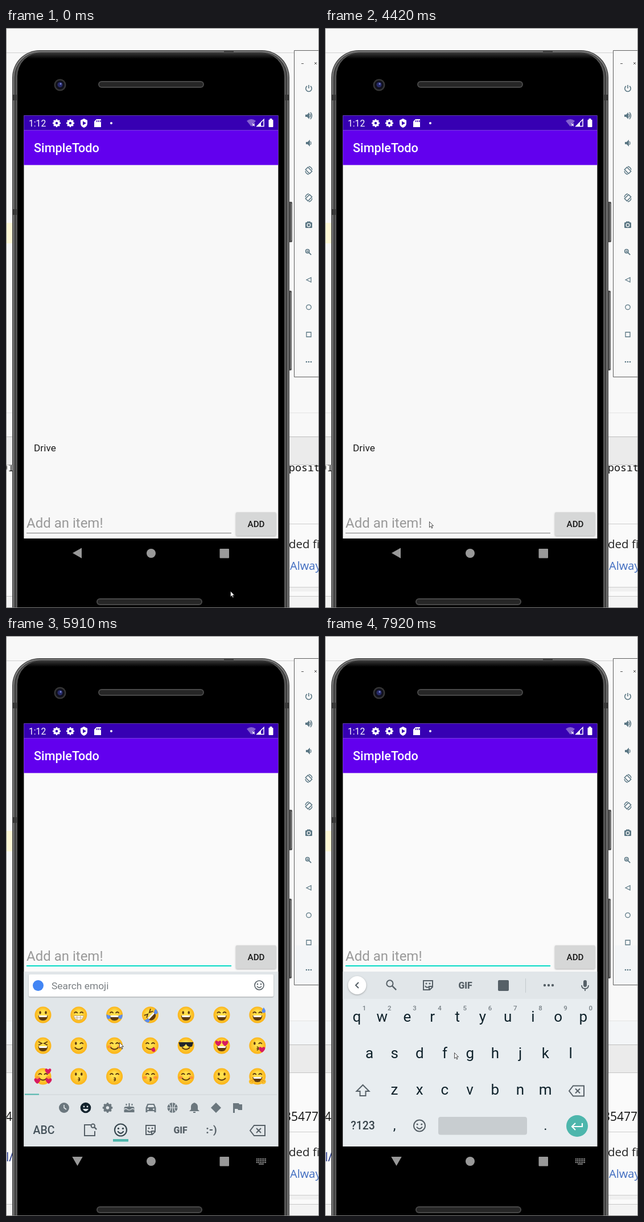
Animation of 550 by 1018 pixels, one loop 8 s. Source, as an HTML page with a canvas:

```html
<!DOCTYPE html>
<html lang="en">
<head>
<meta charset="utf-8">
<title>Todo app in a phone emulator</title>
<style>
html, body { margin: 0; overflow: hidden; }
canvas { display: block; }
</style>
</head>
<body>
<canvas id="stage" width="550" height="1018"></canvas>
<script>
const c = document.getElementById('stage').getContext('2d');
const LOOP = 8000, TEAL = '#4db6ac', ACCENT = '#03dac5', SLATE = '#5b7784', KEY = '#0f222b', ICON = '#566067';
const SCREEN = { x: 31.4, w: 447, top: 153.4, nav: 896, bottom: 948 };

// ---- drawing helpers ----
function rect(x, y, w, h, fill, r = 0) {
  c.fillStyle = fill;
  c.beginPath();
  c.roundRect(x, y, w, h, r);
  c.fill();
}
function band(y, bottom, fill) {
  rect(SCREEN.x, y, SCREEN.w, bottom - y, fill);
}
function oval(x, y, rx, fill, ry = rx) {
  c.fillStyle = fill;
  c.beginPath();
  c.ellipse(x, y, rx, ry, 0, 0, 7);
  c.fill();
}
function ring(x, y, r, color, width = 2) {
  c.strokeStyle = color;
  c.lineWidth = width;
  c.beginPath();
  c.arc(x, y, r, 0, 7);
  c.stroke();
}
function text(s, x, y, size, color, { font = 'Roboto', weight = 400, align = 'left' } = {}) {
  c.font = `${weight} ${size}px "${font}", sans-serif`;
  c.textAlign = align;
  c.fillStyle = color;
  c.fillText(s, x, y);
}
function at(x, y, draw, angle = 0) {
  c.save();
  c.translate(x, y);
  c.rotate(angle);
  draw();
  c.restore();
}
function fillPath(d, x, y, color, angle = 0) {
  at(x, y, () => { c.fillStyle = color; c.fill(new Path2D(d)); }, angle);
}
function strokePath(d, x, y, color, width = 2, angle = 0) {
  at(x, y, () => {
    c.strokeStyle = color;
    c.lineWidth = width;
    c.stroke(new Path2D(d));
  }, angle);
}
function shadowed(blur, draw) {
  c.save();
  c.shadowColor = 'rgba(0,0,0,.3)';
  c.shadowBlur = blur;
  c.shadowOffsetY = 1;
  draw();
  c.restore();
}
function clipped(x, y, w, h, draw) {
  c.save();
  c.beginPath();
  c.rect(x, y, w, h);
  c.clip();
  draw();
  c.restore();
}

// ---- shared icons ----
function gear(x, y, color, r = 4) {
  ring(x, y, r, color, r * .9);
  for (let i = 0; i < 8; i++) strokePath(`M${r * 1.3} 0H${r * 1.75}`, x, y, color, r * .65, i * Math.PI / 4);
}
function smiley(x, y, r, color, width = 2) {
  ring(x, y, r, color, width);
  oval(x - r * .38, y - r * .25, r * .16, color);
  oval(x + r * .38, y - r * .25, r * .16, color);
  strokePath(`M${-r * .5} ${r * .2}Q0 ${r * .9} ${r * .5} ${r * .2}`, x, y, color, width);
}
function search(x, y, r, color, width = 2) {
  ring(x - r * .3, y - r * .3, r * .8, color, width);
  strokePath(`M${r * .3} ${r * .3}L${r * 1.3} ${r * 1.3}`, x, y, color, width * 1.2);
}
function sticker(x, y) {
  strokePath('M-8-8H8V3L3 8H-8ZM8 2H2V8M-5 1Q-3 5 1 3', x, y, ICON);
  oval(x - 3, y - 3, 1.5, ICON);
  oval(x + 3, y - 3, 1.5, ICON);
}
function gif(x, y) {
  text('GIF', x, y + 5.5, 15.8, ICON, { weight: 900, align: 'center' });
}
function backspace(x, y) {
  strokePath('M-13 0L-6-9H13V9H-6ZM-2-4L6 4M6-4L-2 4', x, y, ICON);
}
function mic(x, y) {
  rect(x - 3, y - 9, 6, 12, ICON, 3);
  strokePath('M-6 0Q-6 6 0 6Q6 6 6 0M0 6V10', x, y, ICON, 1.8);
}
function dots(x, y, gap, r, color) {
  for (let i = -1; i < 2; i++) oval(x + i * gap, y, r, color);
}

// ---- page and window behind the phone ----
function backdrop(later) {
  rect(0, 0, 550, 1018, '#f8f8f8');
  rect(0, 43, 550, 1, '#cfcfcf');
  rect(0, 342, 14, 36, '#fff8d6');
  if (later) rect(0, 676, 550, 41, '#f3f5f7');
  rect(0, 675, 550, 1, '#e4e4e4');
  rect(0, 717, 550, 50, '#ebebeb');
  rect(0, 717, 550, 1, '#bdbdbd');
  rect(0, 766, 550, 1, '#c4c4c4');
  rect(0, 767, 550, 251, '#fafafa');
  const sans = { font: 'Open Sans' };
  if (later) {
    text('35477', 489, 851, 21, '#111', sans);
    text('43', -1, 851, 21, '#111', sans);
    text('l/', 0, 922, 21, '#1c2f86', sans);
  } else {
    clipped(0, 767, 550, 30, () => {
      const mono = { font: 'Noto Sans Mono', weight: 500 };
      text('posit', 497, 778, 18.3, '#111', mono);
      text('01.', -8, 778, 18.3, '#111', mono);
    });
  }
  rect(490, 982, 60, 7, '#f0f0f0');
  strokePath('M480 870.5H550M480 981.5H550', 0, 0, '#cccccc', 1);
  text('ded fi', 497, 913, 20.5, '#222', sans);
  text('Alway', 499, 951, 20, '#3f6cc0', sans);
  rect(0, 997, 550, 1, '#c8c8c8');
  rect(0, 998, 550, 20, '#f3f3f3');
}

function emulatorPanel(later) {
  rect(506, 39, 44, 573, '#f8f8f8');
  if (later) rect(506, 543, 44, 69, '#f3f5f7');
  strokePath('M550 39.5H506.5V612.5H550', 0, 0, '#5c5c5c', 1);
  strokePath('M519 62.5H523M542 60L546 64M546 60L542 64', 0, 0, '#555', 1);
  const x = 532;
  strokePath('M-3-4A5.2 5.2 0 1 0 3-4M0-6V0', x, 106, SLATE, 1.6);
  for (const [y, waves] of [[154, 1], [202, 0]]) {
    fillPath('M-5-2H-2L2-6V6L-2 2H-5Z', x - waves, y, SLATE);
    if (waves) strokePath('M3-3Q5 0 3 3M4-6Q9 0 4 6', x - 1, y, SLATE, 1.5);
    else strokePath('M3-3Q5 0 3 3', x, y, SLATE, 1.3);
  }
  for (const [y, side] of [[250, 1], [298, -1]]) {
    strokePath('M-3-5H3V5H-3Z', x, y, SLATE, 1.5, -side * Math.PI / 4);
    strokePath(`M${-side * 6} 1Q${-side * 5} 6 0 7M${side * 6}-1Q${side * 5}-6 0-7`, x, y, SLATE, 1.3);
  }
  rect(x - 6, 341, 12, 10, SLATE, 1.5);
  rect(x - 3, 339.5, 6, 3, SLATE);
  ring(x, 346, 2.8, '#f8f8f8', 1.3);
  search(x - 1, 393, 4, SLATE, 1.5);
  strokePath('M-4-1H0M-2-3V1', x, 393, SLATE, 1);
  strokePath('M-4 0L4-4V4Z', x, 442, SLATE, 1.3);
  ring(x, 490, 4.2, SLATE, 1.3);
  strokePath('M-4-4H4V4H-4Z', x, 538, SLATE, 1.3);
  dots(x, 586, 4, 1.3, SLATE);
}

function phone() {
  rect(496, 305, 7, 71, '#4d4d4d', 2);
  rect(496, 461, 6, 140, '#4d4d4d', 2);
  strokePath('M501.5 308V373M500.5 464V598', 0, 0, '#9a9a9a', 1);
  rect(11, 39, 487, 1100, '#3d3d3d', 48);
  c.strokeStyle = '#808080';
  c.lineWidth = 2;
  c.beginPath();
  c.roundRect(13.5, 41.5, 482, 1100, 45);
  c.stroke();
  rect(17, 43, 475, 1100, '#555', 43);
  const edge = c.createLinearGradient(0, 43, 0, 54);
  edge.addColorStop(0, '#3a3a3a');
  edge.addColorStop(1, '#000');
  rect(20, 43, 469, 1100, edge, 42);
  for (const y of [117, 318]) rect(11, y, 8, 10, '#383838');
  rect(490, 117, 8, 10, '#383838');
  rect(383, 40, 17, 4, '#444');

  oval(95, 100, 10.5, '#363636');
  oval(95, 100, 8, '#11111c');
  oval(95, 99.5, 4.5, '#262a68');
  oval(96, 98, 1.5, '#7c8ad8');
  for (const [x, y] of [[162, 93], [159, 1001]]) {
    rect(x, y, 186, 12, '#484848', 6);
    rect(x + 2, y + 2, 182, 8, '#262626', 4);
  }
}

// ---- app ----
function appBars() {
  band(SCREEN.top, 179.6, '#3700b3');
  band(179.6, 240.4, '#6200ee');
  text('1:12', 40, 173, 15.7, '#fff');
  gear(89, 167, '#fff');
  gear(113, 167, '#fff');
  fillPath('M0-8L6-5V0Q6 6 0 8Q-6 6-6 0V-5Z', 137, 167, '#fff');
  fillPath('M-2-3.5L4 0L-2 3.5Z', 137, 167, '#3700b3');
  fillPath('M-2-7H6V7H-6V-3Z', 161, 167, '#fff');
  for (const x of [159, 162, 165]) rect(x, 162, 1.5, 3, '#3700b3');
  oval(185, 167, 2, '#fff');
  fillPath('M-8-4Q0-10 8-4L0 6Z', 431, 167, 'rgba(255,255,255,.38)');
  strokePath('M-2-2L2 2M2-2L-2 2', 435, 170, '#fff', 1.3);
  strokePath('M0 12L12 0V12Z', 441, 160.5, '#fff', 1.5);
  fillPath('M0 12L7 5V12Z', 441, 160.5, '#fff');
  rect(461.5, 161, 8, 13, '#fff', 1);
  rect(463.5, 159, 4, 3, '#fff');
  text('SimpleTodo', 49, 218, 21.7, '#fff', { weight: 500 });
}

function inputRow(dy, focused, caret) {
  at(0, dy, () => {
    text('Add an item!', 36, 877, 24, '#999');
    if (focused) rect(36, 885, 360, 2, ACCENT);
    else rect(36, 886, 360, 1, '#777');
    if (caret) rect(36, 852, 2, 33, ACCENT);
    shadowed(3, () => rect(404, 850, 70.5, 41, '#d6d7d7', 2));
    text('ADD', 439.5, 876, 15.2, '#161616', { weight: 500, align: 'center' });
  });
}

function navBar(turn) {
  const color = turn > 0 && turn < 1 ? '#d8d8d8' : '#999';
  fillPath('M-8.5 0L7.5-9.2V9.2Z', 125.5, 921.6, color, -turn * Math.PI / 2);
  oval(255, 922, 8, color);
  rect(375.5, 914, 16.5, 16.5, color, 1);
  if (turn > .5) {
    for (let i = 0; i < 18; i++) rect(440 + i % 6 * 3, 917 + Math.floor(i / 6) * 3, 2, 2, color);
    rect(444, 926, 9, 1.5, color);
  }
}

function keyboard(expanded, pressed) {
  band(589, 949, '#e8edf0');
  band(589, 637, '#e1e6e9');
  shadowed(3, () => oval(56.5, 613, 16, '#fff'));
  strokePath(expanded ? 'M2.5-5L-2.5 0L2.5 5' : 'M-2.5-5L2.5 0L-2.5 5', 56.5, 613, ICON);
  mic(457, 613);
  if (expanded) {
    search(116, 612, 7, ICON);
    sticker(181, 613);
    gif(246.5, 613);
    rect(304, 604, 19, 19, ICON, 2);
    rect(352, 601, 1, 25, '#c3c9cc');
    dots(393, 613, 7, 2.2, ICON);
  }
  const rows = [['qwertyuiop', 56, 677], ['asdfghjkl', 78, 741], ['zxcvbnm', 122, 805]];
  for (const [keys, left, base] of rows)
    [...keys].forEach((key, i) => text(key, left + i * 44.2, base, 26, KEY, { align: 'center' }));
  [...'1234567890'].forEach((n, i) => text(n, 69 + i * 44.2, 657, 11.5, '#788187', { weight: 500, align: 'center' }));
  strokePath('M0-10L11 1H5V9H-5V1H-11Z', 66.5, 798, ICON);
  backspace(442, 798.5);
  if (pressed) rect(146, 844, 40, 32, '#d0d5d8', 4);
  text('?123', 66.5, 866, 19.4, '#37434a', { weight: 500, align: 'center' });
  text(',', 122, 867, 24, KEY, { align: 'center' });
  smiley(166, 859.5, 10, ICON);
  rect(199, 844, 156, 31.5, '#c8cdd0', 4);
  text('.', 387.5, 867, 24, KEY, { align: 'center' });
  oval(443, 860, 19, TEAL);
  strokePath('M9-5V1H-8M-3-5L-9 1L-3 7', 443, 860, '#fff', 2.2);
}

// Slides up while fading in as one layer, passing under the navigation bar.
function risingKeyboard(offset, opacity) {
  clipped(SCREEN.x, 589, SCREEN.w, SCREEN.bottom - 589, () => {
    band(SCREEN.nav, SCREEN.bottom, '#fafafa');
    c.translate(0, offset);
    keyboard(false, false);
    band(589, 949, `rgba(250,250,250,${1 - opacity})`);
  });
  band(SCREEN.nav, SCREEN.bottom, 'rgba(0,0,0,.54)');
}

// ---- emoji panel: each face is eyes, mouth, optional extra ----
const FACES = '.D ^E ^Dt >Dr .D ^D ^Ds >D ;) ^)b ^p B) hD ;*h ^)H .* ^* ^*b ^)b .) ^Dg'.split(' ');
const HEART = 'M0 5C-10-2-4-8 0-3C4-8 10-2 0 5Z', DROP = 'M0-5Q4 0 3 3Q0 6-3 3Q-4 0 0-5Z';
const BROWN = '#5d3a10', PINK = '#d81b60', BLUE = '#5b8def';

function face(x, y, [eyes, mouth, extra]) {
  at(x, y, () => {
    const skin = c.createRadialGradient(0, -3, 4, 0, 0, 15);
    skin.addColorStop(0, '#ffe04d');
    skin.addColorStop(1, '#fbb116');
    oval(0, 0, 14.5, skin);
    if (extra === 'b' || extra === 'H') for (const s of [-9, 9]) oval(s, 2, 3.5, 'rgba(255,110,60,.55)', 2.5);
    if (eyes === 'B') fillPath('M-13-6H13L11 1Q7 4 2 0L0-3L-2 0Q-7 4-11 1Z', 0, 0, '#22262b');
    else for (const s of [-1, 1]) {
      const ex = s * 5;
      if (eyes === '.' || (eyes === ';' && s < 0)) oval(ex, -4, 1.8, BROWN, 2.8);
      else if (eyes === 'h') fillPath(HEART, s * 6, -4, PINK);
      else if (eyes === '>') strokePath(`M${s * 3}-7L${-s * 3}-4L${s * 3}-1`, ex, 0, BROWN, 1.8);
      else strokePath('M-3-3Q0-7 3-3', ex, 0, BROWN, 1.8);
    }
    if (mouth === 'D') {
      fillPath('M-8.5 1H8.5Q8 10 0 10Q-8 10-8.5 1Z', 0, 0, BROWN);
      fillPath('M-7.5 1H7.5L6.5 4H-6.5Z', 0, 0, '#fff');
    } else if (mouth === 'E') {
      const grin = 'M-8.5 1.5H8.5Q8 9 0 9Q-8 9-8.5 1.5Z';
      fillPath(grin, 0, 0, '#fff');
      strokePath(grin + 'M-8 5H8M-3 2V9M3 2V9', 0, 0, '#b79a68', .8);
    } else if (mouth === '*') {
      strokePath('M-1 2Q4 3 0 5Q4 6-1 8', 0, 0, BROWN, 1.7);
    } else {
      strokePath('M-7 3Q0 10 7 3', 0, 0, BROWN, 1.8);
      if (mouth === 'p') fillPath('M1 6L7 3Q11 9 7 11Q3 11 1 6Z', 0, 0, PINK);
    }
    if (extra === 't' || extra === 'r') for (const s of [-1, 1]) fillPath(DROP, s * 11, 3, BLUE, s * .7);
    if (extra === 's') fillPath(DROP, 11, -8, BLUE);
    if (extra === 'h') fillPath(HEART, 8, 7, PINK);
    if (extra === 'H') for (const [hx, hy] of [[-10, 8], [10, 8], [9, -9]]) fillPath(HEART, hx, hy, PINK);
    if (extra === 'g') for (const s of [-1, 1]) {
      oval(s * 10, 9, 5, '#fbc02d', 4.5);
      strokePath(`M${s * 6} 7L${s * 10} 11M${s * 7} 5L${s * 13} 9`, 0, 0, '#d98a12', 1);
    }
  }, extra === 'r' ? -.8 : 0);
}

function categories() {
  const y = 828, gray = '#6b777e', gap = '#e1e6e9';
  oval(102, y, 9, gray);
  strokePath('M0-5V0L4 3', 102, y, gap, 1.6);
  oval(140, y, 9.3, '#13232d');
  for (const s of [-3, 3]) oval(140 + s, y - 2, 1.4, gap);
  fillPath('M-5 2H5Q3 6 0 6Q-3 6-5 2Z', 140, y, gap);
  gear(178.5, y, gray, 5);
  fillPath('M-9 8V1Q-9-2-6-2H-1V-8H1V-2H6Q9-2 9 1V8ZM-6-4V-7H-4V-4ZM4-4V-7H6V-4Z', 216.5, y, gray);
  strokePath('M-9 3Q-6 0-3 3Q0 5 3 3Q6 0 9 3', 216.5, y, gap, 1.2);
  fillPath('M-9 8V0L-6-7H6L9 0V8H6V6H-6V8Z', 254.5, y, gray);
  fillPath('M-6-1H6L4.5-5H-4.5Z', 254.5, y, gap);
  for (const s of [-5, 5]) oval(254.5 + s, y + 2.5, 1.5, gap);
  oval(292.5, y, 9, gray);
  strokePath('M0-9V9M-9 0H9M-6-7Q0 0-6 7M6-7Q0 0 6 7', 292.5, y, gap, 1.2);
  fillPath('M-9 6L-6 3V-2Q-6-7 0-9Q6-7 6-2V3L9 6ZM-2 7H2V9H-2Z', 331, y, gray);
  fillPath('M0-9L9 0L0 9L-9 0Z', 369, y, gray);
  fillPath('M-8-8H2L3-6H8V4H1L0 2H-5V9H-8Z', 407, y, gray);
}

function emojiPanel(pressed) {
  band(589, SCREEN.nav, '#e1e6e9');
  shadowed(2, () => rect(40, 594, 430, 39, '#fff', 2));
  oval(56.5, 613.5, 9.5, '#4285f4');
  text('Search emoji', 80, 620, 17.4, '#7a7f83');
  smiley(445, 613, 8, ICON, 1.6);
  FACES.forEach((f, i) => face(65 + i % 7 * 62.8, 665 + Math.floor(i / 7) * 54, f));
  rect(33, 804.5, 443, 1, '#cfd5d8');
  rect(33, 803.5, 25, 2, TEAL);
  categories();
  if (pressed) rect(36.5, 852, 60.5, 31.5, '#d0d4d6', 2);
  text('ABC', 66.5, 874, 19.5, '#46535b', { align: 'center', weight: 500 });
  strokePath('M2-9H-9V10H9V2', 147, 867, ICON);
  search(154, 861, 4, ICON, 2);
  smiley(201.5, 867, 10.5, '#37474f', 2.2);
  rect(188, 883, 27, 4.5, TEAL);
  sticker(254, 867);
  gif(306.5, 867);
  text(':-)', 361, 873, 19, ICON, { weight: 700, align: 'center' });
  backspace(442, 868);
}

// ---- timeline ----
// Pointer stops: time, x, y; it jumps from stop to stop and is hidden without a place.
const POINTER = [
  [0, 394, 988], [300, 396, 1009], [500], [1320, 54, 703], [1440, 129, 242], [1560, 223, 105], [1710],
  [2490, 344, 121], [2610, 332, 265], [2730, 328, 345], [2850, 296, 558], [3000, 268, 769],
  [3250, 205, 867], [3370, 196, 867], [3520, 194, 867], [4420, 183, 866], [4570, 172, 860],
  [5910, 199, 713], [6150, 194, 722], [6300, 182, 742], [6420, 152, 778], [6540, 120, 812],
  [6660, 98, 833], [6810, 78, 856], [6930, 67, 867], [7650, 118, 818], [7770, 210, 744], [7920, 227, 731]
];
const between = (t, from, to) => t >= from && t < to;

function pointer(t) {
  const [, x, y] = POINTER.findLast(stop => stop[0] <= t);
  if (x === undefined) return;
  const arrow = 'M.5.5V10.5L2.8 8.3L4.5 12L6 11.3L4.4 7.7H7.5Z';
  fillPath(arrow, x, y, '#fff');
  strokePath(arrow, x, y, '#222', .8);
}

function draw(t) {
  const open = t >= 4840;
  const emoji = between(t, 5910, 7350);
  const caret = between(t, 5230, 5790) || between(t, 6300, 6660) || between(t, 7230, 7770);

  backdrop(open);
  emulatorPanel(open);
  phone();
  band(SCREEN.top, SCREEN.nav, open ? '#fafafa' : '#f8f8f8');
  appBars();
  if (!open) text('Drive', 49, 742.5, 17.3, '#1c1c1c');
  inputRow(open ? -307 : 0, t >= 4720, caret);

  if (emoji) emojiPanel(t >= 7230);
  else if (between(t, 4840, 4960)) risingKeyboard(190, .2);
  else if (between(t, 4960, 5080)) risingKeyboard(77, .5);
  else if (open) {
    clipped(SCREEN.x, 589, SCREEN.w, SCREEN.nav - 589, () => keyboard(t >= 7500, between(t, 5790, 5910)));
  }
  navBar(!open ? 0 : t < 4960 ? .4 : t < 5080 ? .82 : 1);
  pointer(t);
  c.strokeStyle = '#808080';
  c.lineWidth = 1;
  c.strokeRect(.5, .5, 549, 1017);
}

const start = performance.now();
function tick() {
  draw((performance.now() - start) % LOOP);
  requestAnimationFrame(tick);
}
tick();
</script>
</body>
</html>
```
